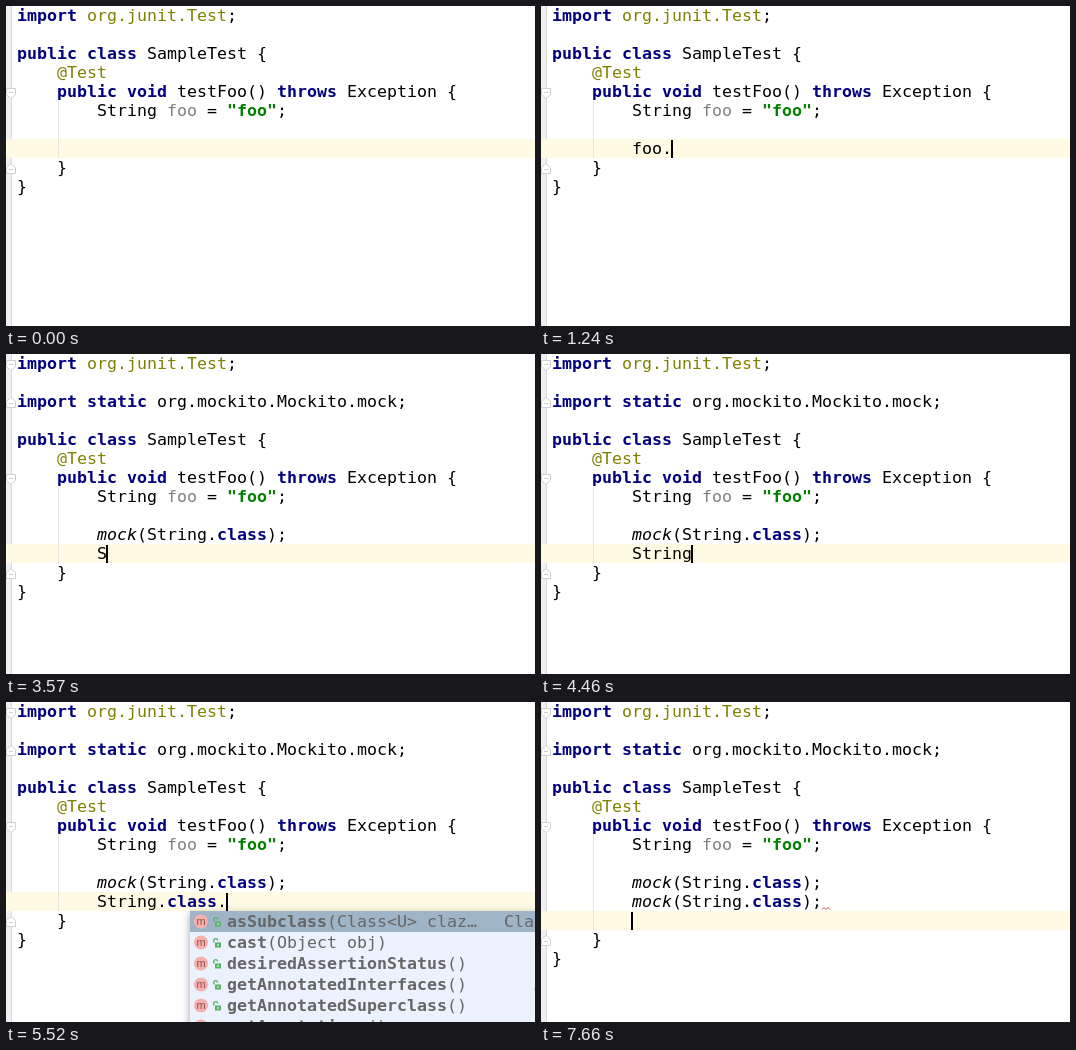
These frames come from a looping animation (529 px wide and 320 px high, 8000 ms). An HTML page:

```html
<!DOCTYPE html>
<html lang="en">
<head>
<meta charset="utf-8">
<title>Postfix completion</title>
<style>
  html, body { margin: 0; width: 100%; height: 100%; overflow: hidden; background: #fff; }
  #stage { position: relative; width: 529px; height: 320px; overflow: hidden; background: #fff; }
  #stage div, #stage svg, pre { position: absolute; margin: 0; }
  pre, .item { font: 16.61px/19px "DejaVu Sans Mono", monospace; white-space: pre; color: #000; }
  #code { left: 11px; top: 0; }
  #gutter { left: 0; top: 0; width: 5px; height: 320px; background: #f0f0f0; border-right: 1px solid #dadada; }
  #row { left: 0; width: 529px; height: 19px; background: #fffae3; }
  #guide { left: 52px; width: 1px; background: #e4e4e0; }
  #caret { width: 2px; height: 18px; background: #000; }
  #folds, #wave { left: 0; top: 0; overflow: visible; }
  .key { color: #000080; font-weight: bold; }
  .str { color: #008000; font-weight: bold; }
  .ann { color: #808000; }
  .dim { color: #808080; }
  .call { font-style: italic; }
  #popup { background: #ebf2fe; box-shadow: 0 3px 8px rgba(0, 0, 0, .38); }
  #popup .item { left: 0; width: 100%; height: 21px; line-height: 21px; color: #666; }
  #popup .item:first-child { background: #9fb4c6; }
  .item span { position: absolute; left: 37px; }
  .item .type { left: auto; right: 4px; }
  #popup .hint { left: 0; width: 100%; height: 15px; overflow: hidden; background: #f0f0f0; color: #111;
    font: 11.6px/15px "Open Sans", "Noto Sans", sans-serif; white-space: pre; text-indent: 2px; }
  .hint u { color: #00f; margin-left: 6px; }
</style>
</head>
<body>
<div id="stage">
  <div id="gutter"></div>
  <div id="row"></div>
  <div id="guide"></div>
  <svg id="folds" width="12" height="320" fill="#fff" stroke="#cfcfcf"></svg>
  <pre id="code"></pre>
  <svg id="wave" width="529" height="320" fill="none" stroke="#e03c3c"></svg>
  <div id="caret"></div>
  <div id="popup"></div>
</div>
<script>
const LOOP = 8000, CH = 10, LH = 19, X0 = 11, ITEM = 21;
const $ = id => document.getElementById(id);
const MOCK = 'mock(String.class)';

// Popup rows: icon|name|parameters|type
const lists = {
  f: ['v|foo||String', 'k|final||', 'k|float||', 'k|for||', 'C|Float| (java.lang)|',
      'C|FloatBuffer| (java.nio)|', 'C|Formatter| (java.util)|', 'C|File| (java.io)|', 'C|Future||'],
  foo: ['m|charAt|(int index)|char', 'm|chars|()|IntStream', 'm|codePointAt|(int index)|int',
        'm|codePointBefore|(int index)|int', 'm|codePoints|()|IntStream',
        'm|compareTo|(String anotherString)|int', 'm|concat|(String str)|String',
        'm|contains|(CharSequence s)|boolean', 'm|endsWith|(String suffix)|boolean'],
  S: ['C|String| (java.lang)|', 'C|StringBuilder| (java.lang)|', 'C|StringBuffer| (java.lang)|',
      'C|StringReader| (java.io)|', 'C|StringWriter| (java.io)|', 'C|StringJoiner| (java.util)|'],
  c: ['k|class||Class<String>', 'm|copyValueOf|(char[] data)|String', 'm|copyValueOf|(char[] data, …|String',
      'f|CASE_INSENSITIVE_ORDER||Comparator', 'm|format|(String format, …|String', 'm|join|(CharSequence d…|String'],
  cls: ['m|asSubclass|(Class<U> claz…|Class<? extends U>', 'm|cast|(Object obj)|T',
        'm|desiredAssertionStatus|()|boolean', 'm|getAnnotatedInterfaces|()|AnnotatedType[]',
        'm|getAnnotatedSuperclass|()|AnnotatedType', 'm|getAnnotations|()|Annotation[]'],
  m: ['m|getMethod|(String name, …|Method', 'm|getMethods|()|Method[]', 'm|getModifiers|()|int',
      'm|isMemberClass|()|boolean', 'm|getDeclaredMethod|(Stri…|Method', 'm|getDeclaredMethods|()|Method[]'],
  mo: ['|mock||mock()', 'm|getModifiers|()|int', 'm|isMemberClass|()|boolean'],
  mock: ['|mock||mock()']
};

// time, finished lines, typed text, popup, flag
const steps = [
  [0, 0, '', '', 'idle'],
  [540, 0, 'f'], [720, 0, 'f', 'f'], [890, 0, 'fo', 'f'], [1070, 0, 'foo', 'f'],
  [1240, 0, 'foo.'], [1420, 0, 'foo.', 'foo'],
  [1960, 0, 'foo.mo', 'mock'], [2140, 0, 'foo.mock', 'mock'],
  [2500, 0, MOCK, '', 'raw'], [2680, 0, MOCK, '', 'err'], [2860, 0, MOCK + ';', '', 'err'],
  [3030, 1, '', '', 'prev'], [3210, 1, ''],
  [3570, 1, 'S'], [3750, 1, 'St', 'S'], [3930, 1, 'Str', 'S'], [4100, 1, 'Stri', 'S'],
  [4280, 1, 'Strin', 'S'], [4460, 1, 'String'],
  [4630, 1, 'String.'], [4810, 1, 'String.c', 'c'], [4990, 1, 'String.cla', 'c'],
  [5170, 1, 'String.class'], [5340, 1, 'String.class.'], [5520, 1, 'String.class.', 'cls'],
  [5700, 1, 'String.class.m', 'm'], [5880, 1, 'String.class.mo', 'mo'],
  [6420, 1, 'String.class.moc', 'mock'], [6590, 1, 'String.class.mock', 'mock'],
  [6950, 1, MOCK, '', 'raw'], [7130, 1, MOCK, '', 'err'], [7300, 1, MOCK + ';', '', 'err'],
  [7660, 2, '', '', 'prev']
];

const rules = [
  ['str', '"\\w+"'],
  ['key', '\\b(?:import|static|public|class|void|throws)\\b'],
  ['ann', '@Test|org\\.junit\\.Test'],
  ['dim', '(?<=String )foo'],
  ['call', '\\bmock(?=\\()']
];
const tokens = new RegExp(rules.map(([name, re]) => `(?<${name}>${re})`).join('|'), 'g');

const esc = s => s.replace(/&/g, '&amp;').replace(/</g, '&lt;');
const paint = s => s.replace(tokens, (...a) => {
  const groups = a[a.length - 1];
  const name = Object.keys(groups).find(k => groups[k]);
  return `<span class="${name}">${a[0]}</span>`;
});

function fold(row, up) {
  const y = row * LH + (up ? 10.5 : 11.5), s = up ? -1 : 1;
  return `<path d="M.5 ${y - 5 * s}h9v${6 * s}l-4.5 ${4 * s}l-4.5 ${-4 * s}z"/><path d="M3 ${y - s}h4"/>`;
}

const disc = { m: ['#f5b1ae', '#8c4a48'], C: ['#a9d3ea', '#36708e'], v: ['#f3c6a0', '#8a5a2c'], f: ['#f3d58f', '#846314'] };
function icon(kind) {
  if (!disc[kind]) return '';
  const [fill, ink] = disc[kind];
  const lock = kind === 'm' || kind === 'f'
    ? '<path d="M23.8 10.5V8.5a1.9 1.9 0 0 1 3.8 0" fill="none" stroke="#58b368" stroke-width="1.4"/><rect x="25" y="10.5" width="6" height="5" fill="#58b368"/><path d="M28 12v2" stroke="#fff"/>' : '';
  return `<svg width="36" height="21"><circle cx="11" cy="10.5" r="7" fill="${fill}"/><text x="11" y="14" text-anchor="middle" fill="${ink}" font-family="Liberation Sans, sans-serif" font-size="11">${kind}</text>${lock}</svg>`;
}

function showPopup(key, text, row) {
  const box = $('popup'), list = lists[key];
  box.style.display = list ? 'block' : 'none';
  if (!list) return;
  const start = 8 + text.length - text.match(/\w*$/)[0].length;
  const bottom = list.length * ITEM;
  box.style.left = X0 + start * CH - 37 + 'px';
  box.style.top = (row + 1) * LH + 'px';
  box.style.width = (key === 'mock' ? 458 : 498) + 'px';
  box.style.height = bottom + 15 + 'px';
  box.innerHTML = list.map((item, i) => {
    const [kind, name, args, type] = item.split('|').map(esc);
    const label = kind ? `<b>${name}</b>${args}` : name;
    return `<div class="item" style="top:${i * ITEM}px">${icon(kind)}<span>${label}</span><span class="type">${type}</span></div>`;
  }).join('') + `<div class="hint" style="top:${bottom}px">Press ^. to choose the selected (or first) suggestion and insert a dot afterwards<u>&gt;&gt;</u></div>`;
}

function render([, done, text, popup, flag]) {
  const imported = done > 0 || text.startsWith('mock');
  const pad = ' '.repeat(8);
  const head = ['import org.junit.Test;', ''];
  if (imported) head.push('import static org.mockito.Mockito.mock;', '');
  head.push('public class SampleTest {', '    @Test',
    '    public void testFoo() throws Exception {', pad + 'String foo = "foo";', '');
  const body = Array(done).fill(pad + MOCK + ';');
  const row = head.length + done;
  const current = flag === 'raw' ? esc(text).replace('class', '<span class="key">class</span>') : paint(esc(text));
  $('code').innerHTML = [...[...head, ...body].map(paint), pad + current, '    }', '}'].join('\n');

  const method = head.length - 3;
  $('row').style.top = row * LH + 'px';
  $('guide').style.top = (method + 1) * LH + 'px';
  $('guide').style.height = (row - method) * LH + 'px';
  $('folds').innerHTML = (imported ? fold(0) + fold(2, true) : '') + fold(method) + fold(row + 1, true);

  $('caret').style.display = flag === 'idle' ? 'none' : 'block';
  $('caret').style.left = X0 + (8 + text.length) * CH - 1 + 'px';
  $('caret').style.top = row * LH + 1 + 'px';

  const bad = flag === 'prev' ? [row - 1, MOCK.length + 1] : flag === 'err' ? [row, text.length] : null;
  $('wave').innerHTML = bad
    ? `<path d="M${X0 + (8 + bad[1]) * CH} ${bad[0] * LH + 17.5}l2-2 2 2 2-2 2 2"/>` : '';
  showPopup(popup, text, row);
}

let shown = null;
function tick() {
  const t = performance.now() % LOOP;
  const step = steps.findLast(s => s[0] <= t);
  if (step !== shown) render(shown = step);
  requestAnimationFrame(tick);
}
tick();
</script>
</body>
</html>
```
